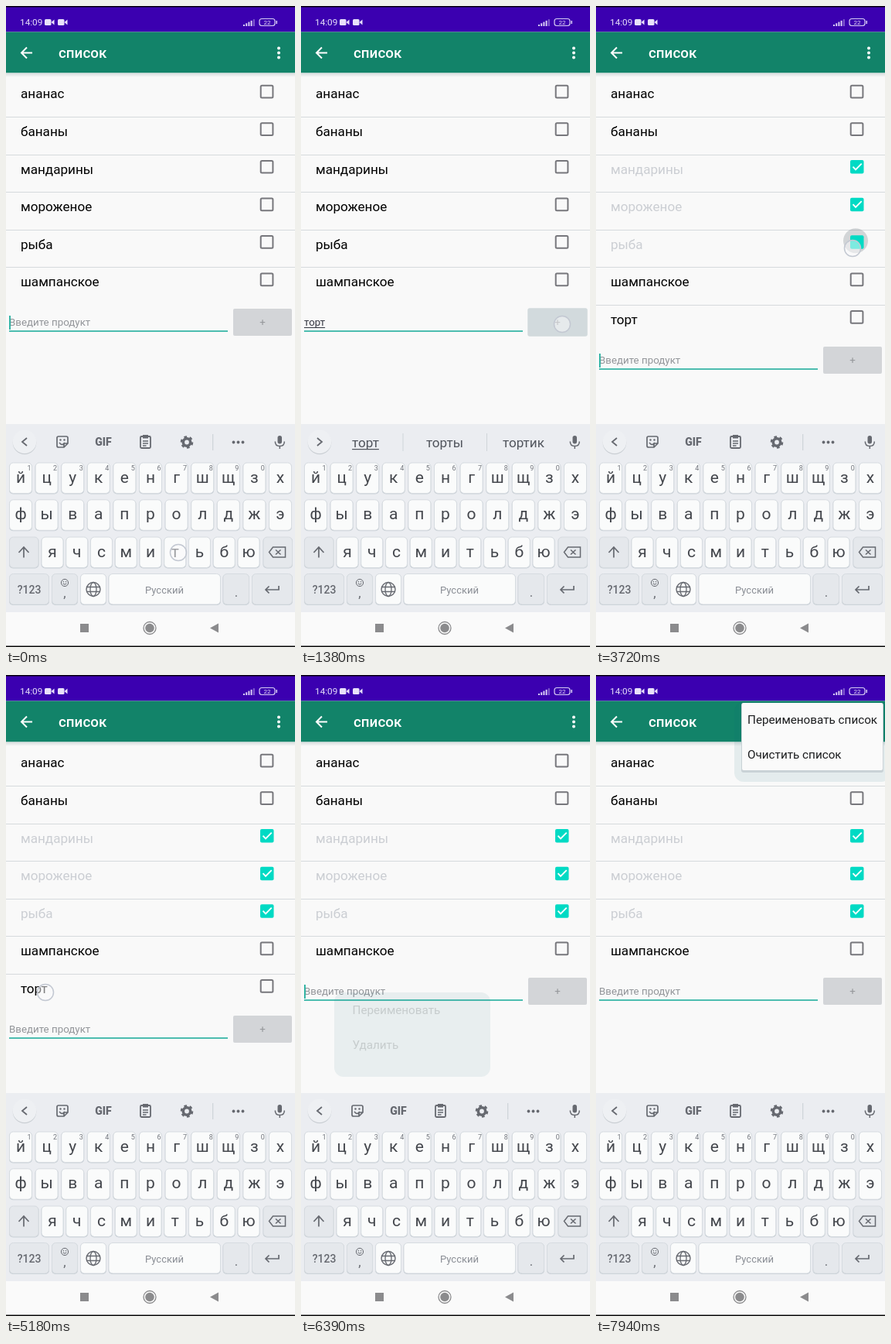
An HTML page with a canvas for the animation above (8000 ms loop, 374x828 px).

```html
<!DOCTYPE html>
<html lang="ru">
<head>
<meta charset="utf-8">
<style>
html, body { margin: 0; width: 100%; height: 100%; overflow: hidden; background: #f9f9f9; }
canvas { display: block; }
</style>
</head>
<body>
<canvas id="stage" width="374" height="828"></canvas>
<script>
const ctx = document.getElementById('stage').getContext('2d');
const LOOP = 8000, ROW = 48.55, BLINK = 487;
const INK = '#666970', TEAL = '#00dac4', LINE = '#d6dadd', PANEL = '#ebedf1';
const ITEMS = ['ананас', 'бананы', 'мандарины', 'мороженое', 'рыба', 'шампанское', 'торт'];
const CHECKED_AT = { 2: 2940, 3: 3260, 4: 3640 };
const ADDED = 1530, DELETED = 6235;

// start, end, x, y
const TOUCHES = [
  [0, 410, 223, 706], [530, 640, 221, 660], [690, 790, 188, 659], [860, 960, 221, 706],
  [1380, 1530, 338, 411],
  [2840, 2990, 326, 213], [3170, 3310, 331, 261], [3560, 3790, 332, 313],
  [5180, 5730, 51, 410], [6070, 6220, 101, 481], [7620, 7770, 352, 62]
];
// start, end, text, suggestions
const TYPING = [
  [410, 610, 'т', ['т', 'так', 'ты']],
  [610, 770, 'то', ['то', 'тогда', 'только']],
  [770, 930, 'тор', ['тор', 'торт', 'торты']],
  [930, ADDED, 'торт', ['торт', 'торты', 'тортик']]
];

const clamp = v => Math.max(0, Math.min(1, v));
const ramp = (t, a, b) => clamp((t - a) / (b - a));
const within = (t, a, b) => t >= a && t < b;

function text(s, x, y, size, color, align = 'left', weight = 400) {
  ctx.font = `${weight} ${size}px Roboto, sans-serif`;
  ctx.textAlign = align;
  ctx.fillStyle = color;
  ctx.fillText(s, x, y);
}
function rect(x, y, w, h, color) {
  ctx.fillStyle = color;
  ctx.fillRect(x, y, w, h);
}
function paint(fill, stroke, width = 1) {
  if (fill) { ctx.fillStyle = fill; ctx.fill(); }
  if (stroke) { ctx.strokeStyle = stroke; ctx.lineWidth = width; ctx.stroke(); }
}
function box(x, y, w, h, r, fill, stroke, width) {
  ctx.beginPath();
  ctx.roundRect(x, y, w, h, r);
  paint(fill, stroke, width);
}
function disc(x, y, r, fill, stroke, width) {
  ctx.beginPath();
  ctx.arc(x, y, r, 0, 7);
  paint(fill, stroke, width);
}
function path(d, x, y, fill, stroke, width) {
  const p = new Path2D(d);
  ctx.save();
  ctx.translate(x, y);
  if (fill) { ctx.fillStyle = fill; ctx.fill(p); }
  if (stroke) { ctx.strokeStyle = stroke; ctx.lineWidth = width; ctx.stroke(p); }
  ctx.restore();
}

function header() {
  rect(0, 0, 374, 33.5, '#3b00b0');
  rect(0, 0, 374, 1.5, '#08000f');
  text('14:09', 18, 25, 11.8, '#e8e0fa');
  for (const x of [50, 67]) {
    box(x, 17, 8.5, 8, 1.5, '#e8e0fa');
    path('M0 0 L4 -3.5 V3.5 Z', x + 8.5, 21, '#e8e0fa');
  }
  for (let i = 0; i < 5; i++) rect(307 + i * 3.2, 24 - i * 1.7, 2, 2 + i * 1.7, i < 4 ? '#d9cdf5' : '#8560d0');
  box(328, 16.5, 20, 9, 3, null, '#d9cdf5', 1.2);
  rect(349.5, 19, 1.5, 4, '#d9cdf5');
  text('22', 338, 24.2, 8, '#e8e0fa', 'center');

  rect(0, 33.5, 374, 53, '#128369');
  path('M7 0 H-7 M0 -7 L-7 0 L0 7', 27, 60.5, null, '#fff', 2);
  text('список', 68, 67, 18.8, '#fff', 'left', 500);
  for (const y of [54.5, 60.5, 66.5]) disc(353, y, 2, '#fff');
  const shade = ctx.createLinearGradient(0, 86, 0, 92);
  shade.addColorStop(0, '#d4dadb');
  shade.addColorStop(1, '#f9f9f9');
  rect(0, 86.5, 374, 5.5, shade);
}

function list(t, count) {
  for (let i = 0; i < count; i++) {
    const y = 111 + i * ROW, since = t - (CHECKED_AT[i] ?? Infinity), done = since >= 0;
    text(ITEMS[i], 19, y + 8.4, 17.1, done ? '#cbced3' : '#000');
    if (i < count - 1) rect(0, Math.round(y + 32), 374, 1, LINE);
    if (within(since, -60, 250)) disc(336, y - 2, 16, `rgba(110,120,125,${.28 * (1 - ramp(since, 80, 250))})`);
    if (done) {
      box(329, y - 9, 17.5, 17.5, 2, TEAL);
      if (since > 100) path('M-5.5 0 L-2 3.7 L5.7 -4', 338, y - .5, null, '#fff', 1.9);
    } else box(329.7, y - 8.2, 15.7, 15.7, 1.5, null, '#77777c', 2);
  }
}

function cursorOn(t) {
  if (t < ADDED) return t < 1380;
  if (t < 5580) return Math.floor((t - 1440) / BLINK) % 2 === 0;
  return t >= DELETED && Math.floor((t - DELETED) / BLINK) % 2 === 0;
}

function inputRow(t, count, typed) {
  const y = Math.round(409 + (count - 6) * ROW);
  text(typed || 'Введите продукт', 4, y + 4, 13.33, typed ? '#333640' : '#929599');
  const end = typed ? 4 + ctx.measureText(typed).width : 4;
  if (typed) rect(4, y + 6, end - 4, 1, '#333640');
  rect(4, y + 10, 283, 2, '#4dbdb0');
  if (cursorOn(t)) rect(end, y - 9, 2, 18, '#35b5a5');
  const pressed = within(t, 1380, 1700);
  box(294, y - 18, 76, 35, 2, pressed ? '#d2dadd' : '#d3d5d8', pressed ? '#d2dadd' : null, 1.5);
  text('+', 332, y + 4, 13.33, '#96989b', 'center');
}

function key(x, y, w, label, special) {
  box(x, y + 1, w, 40, 5, '#c8cfd5');
  box(x + .5, y + .5, w - 1, 39.5, 5, special ? '#e5e8ec' : '#fafbfb', '#d6dbe0');
  if (label) text(label, x + w / 2, y + 26, 21, '#44474d', 'center');
}

function toolIcons() {
  path('M3 -5 L-3 0 L3 5', 24, 563, null, INK, 1.8);
  path('M-7 -5 Q-7 -7 -5 -7 H5 Q7 -7 7 -5 V2 L2 7 H-5 Q-7 7 -7 5 Z M7 2 H2 V7 M-4 1 Q0 6 3 1', 73, 563, null, INK, 1.7);
  disc(70.5, 560.5, 1.2, INK);
  disc(75.5, 560.5, 1.2, INK);
  text('GIF', 126, 567.5, 14, INK, 'center', 900);
  box(174, 556, 13, 15, 1.5, null, INK, 1.8);
  rect(177, 554, 7, 4.5, INK);
  path('M-3.5 -1 H3.5 M-3.5 2 H3.5 M-3.5 5 H1', 180.5, 563, null, INK, 1.4);
  disc(234, 563.5, 4.7, null, INK, 3.6);
  ctx.setLineDash([3.6, 3.6]);
  disc(234, 563.5, 6.9, null, INK, 2.8);
  ctx.setLineDash([]);
  rect(267, 553, 1.3, 21, '#cfd5d9');
  for (const x of [294.5, 300.5, 306.5]) disc(x, 563.5, 1.9, INK);
}

function suggestionBar(words) {
  path('M-3 -5 L3 0 L-3 5', 24, 563, null, INK, 1.8);
  words.forEach((word, i) => {
    const x = [83.5, 186, 288][i];
    text(word, x, 570, 17.1, '#50545c', 'center');
    const w = ctx.measureText(word).width;
    if (!i) rect(x - w / 2, 572, w, 1.2, '#50545c');
  });
  rect(131.5, 552, 1, 23, '#cfd5d9');
  rect(240, 552, 1, 23, '#cfd5d9');
}

function keyboard(words) {
  rect(0, 540, 374, 243, PANEL);
  disc(24, 564, 15.3, '#c9ced3');
  disc(24, 562.8, 15.3, '#eef0f3');
  words ? suggestionBar(words) : toolIcons();
  box(351.5, 555, 5.5, 10.5, 2.75, INK);
  path('M-6 0 Q-6 6 0 6 Q6 6 6 0 M0 6 V9.5', 354.3, 562.5, null, INK, 1.5);

  ['йцукенгшщзх', 'фывапролджэ'].forEach((letters, row) => [...letters].forEach((c, i) => {
    const x = 4 + i * 33.6;
    key(x, 589.5 + row * 47.8, 30, c);
    if (!row && i < 10) text((i + 1) % 10, x + 26, 600, 9, '#70747c', 'center');
  }));
  [...'ячсмитьбю'].forEach((c, i) => key(45.5 + i * 31.75, 685.5, 29, c));
  key(4, 685.5, 38.5, '', true);
  path('M0 7 V-6 M-6.5 .5 L0 -6.5 L6.5 .5', 23, 705.5, null, INK, 1.7);
  key(332.5, 685.5, 38.5, '', true);
  path('M-11 0 L-6 -6.5 H10 V6.5 H-6 Z M-2.5 -3 L4 3 M4 -3 L-2.5 3', 351.5, 705.5, null, INK, 1.5);

  key(4, 733, 52, '', true);
  text('?123', 30, 758.5, 14, INK, 'center', 500);
  key(59, 733, 34, '', true);
  disc(76, 745, 4.6, null, INK, 1);
  path('M-2.3 1 Q0 3.6 2.3 1', 76, 745, null, INK, 1);
  disc(74.4, 743.8, .7, INK);
  disc(77.6, 743.8, .7, INK);
  text(',', 76, 764, 17, INK, 'center');
  key(96, 733, 34);
  disc(113, 753.5, 9, null, INK, 1.4);
  ctx.beginPath();
  ctx.ellipse(113, 753.5, 4, 9, 0, 0, 7);
  paint(null, INK, 1.3);
  path('M-8.5 -3 H8.5 M-8.5 3 H8.5', 113, 753.5, null, INK, 1.3);
  key(132.5, 733, 145.5);
  text('Русский', 205, 758.5, 13, '#8a8e95', 'center');
  key(280.5, 733, 34.5, '', true);
  text('.', 298, 763, 17, INK, 'center');
  key(318, 733, 53, '', true);
  path('M9 -5 V0 H-8 M-3.5 -4.5 L-8 0 L-3.5 4.5', 344, 754, null, INK, 1.7);

  rect(0, 783, 374, 45, '#fafafa');
  rect(96, 798, 11, 11, '#8b8b8d');
  disc(186, 803.5, 8, null, '#8b8b8d', 1.3);
  disc(186, 803.5, 5.8, '#8b8b8d');
  path('M-6 0 L5 -6 V6 Z', 270, 803.5, '#8b8b8d');
  rect(0, 826.5, 374, 1.5, '#080808');
}

function popup(x, y, w, h, pad, labels, show, hide, pressedRow) {
  const cover = show * clamp(1 - hide * 1.6), halo = show * (1 - hide ** 4);
  ctx.save();
  ctx.globalAlpha = halo;
  box(x - 10, y - 1, w + 20, h + 16, 12, 'rgba(20,105,115,.09)');
  ctx.globalAlpha = cover;
  box(x - 1, y, w + 2, h + 3, 3, '#c9d2d6');
  box(x, y, w, h, 2, '#fafafa');
  if (pressedRow) rect(x, y + h / 2, w, h / 2, '#e2e4e5');
  ctx.globalAlpha = Math.max(cover, halo * .2);
  labels.forEach((label, i) => text(label, x + pad, y + 26.5 + i * 45.5, 15.25, '#1b1c1e'));
  ctx.restore();
}

function draw(t) {
  const count = within(t, ADDED, DELETED) ? 7 : 6;
  const entry = TYPING.find(([a, b]) => within(t, a, b));
  rect(0, 0, 374, 828, '#f9f9f9');
  header();
  list(t, count);
  inputRow(t, count, entry?.[2]);
  keyboard(entry?.[3]);

  if (within(t, 5580, 6470))
    popup(53, 411, 182, 93, 13.5, ['Переименовать', 'Удалить'],
      ramp(t, 5560, 5730), ramp(t, 6230, 6470), within(t, 6110, 6310));
  if (within(t, 7620, 7900))
    disc(353, 61, 19, `rgba(255,255,255,${.2 * (1 - ramp(t, 7770, 7900))})`);
  if (t >= 7770)
    popup(189, 36, 182, 87, 7, ['Переименовать список', 'Очистить список'], ramp(t, 7750, 7920), 0);

  for (const [a, b, x, y] of TOUCHES)
    if (within(t, a, b)) disc(x, y, 10.5, 'rgba(250,250,252,.5)', '#c3c8d2', 1.5);
}

function frame() {
  draw(performance.now() % LOOP);
  requestAnimationFrame(frame);
}
frame();
</script>
</body>
</html>
```
